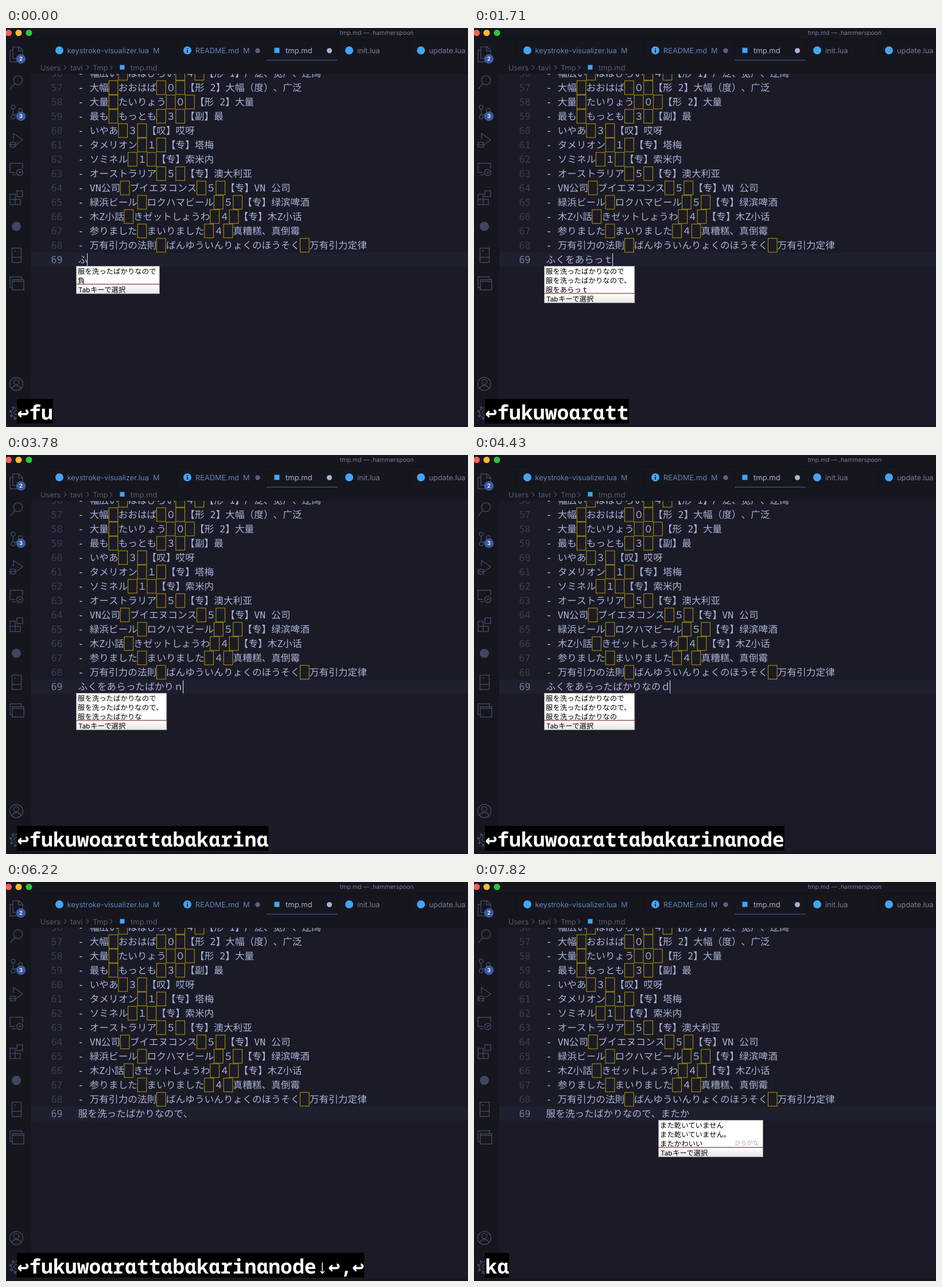
Animation of 805 by 696 pixels, one loop 8000 ms. Source, as an HTML page:

```html
<!DOCTYPE html>
<html lang="ja">
<head>
<meta charset="utf-8">
<title>Typing in an editor</title>
<style>
  html, body { margin: 0; width: 100%; height: 100%; overflow: hidden; background: #1a1b26; }
  svg { display: block; }
  text { white-space: pre; text-rendering: geometricPrecision; font-family: Inter, 'Noto Sans CJK JP', sans-serif; }
  .code { font: 16.66px 'DejaVu Sans Mono', 'Noto Sans CJK SC', 'Noto Sans CJK JP', 'Noto Sans CJK', monospace; }
  .ime { font: 12.4px 'Noto Sans CJK JP', 'Noto Sans CJK', sans-serif; }
  .keys { font: 600 34.75px 'Noto Sans Mono', 'DejaVu Sans Mono', monospace; }
  .icons { fill: none; stroke: #40465f; stroke-width: 1.5; }
</style>
</head>
<body>
<svg id="stage" width="805" height="696" viewBox="0 0 805 696"></svg>
<script>
const LOOP = 8000, LEFT = 125.6, EM = 16.66, HALF = 10.03, LINE = 25, LAST_TOP = 391.5;
const BLUE = '#42a5f5', FG = '#a9b1d6', GIT = '#6183bb', DIM = '#787c99';

const rect = (x, y, w, h, fill, more = '') =>
  `<rect x="${x}" y="${y}" width="${w}" height="${h}" fill="${fill}" ${more}/>`;
const circle = (x, y, r, fill, more = '') =>
  `<circle cx="${x}" cy="${y}" r="${r}" fill="${fill}" ${more}/>`;
const text = (x, y, str, fill, size = 12.8, more = '') =>
  `<text x="${x}" y="${y}" fill="${fill}" font-size="${size}" ${more}>${str}</text>`;
const path = d => `<path d="${d}"/>`;

// Code text on the editor grid; ideographic spaces get a warning box.
function codeText(str, x, top, fill) {
  const xs = [];
  let boxes = '';
  for (const c of str) {
    xs.push(x.toFixed(2));
    if (c === '　') boxes += rect(x + .3, top + .5, EM - 1, 24, 'none', 'stroke="#bd9b03"');
    x += c < '\x7f' ? HALF : EM;
  }
  return boxes + text(xs.join(' '), top + 18.8, str, fill, EM, 'class="code"');
}

const rows = [
  '幅広い　はばひろい　４　【形 1】广泛、宽广、辽阔',
  '大幅　おおはば　０　【形 2】大幅（度）、广泛',
  '大量　たいりょう　０　【形 2】大量',
  '最も　もっとも　３　【副】最',
  'いやあ　３　【叹】哎呀',
  'タメリオン　１　【专】塔梅',
  'ソミネル　１　【专】索米内',
  'オーストラリア　５　【专】澳大利亚',
  'VN公司　ブイエヌコンス　５　【专】VN 公司',
  '緑浜ビール　ロクハマビール　５　【专】绿滨啤酒',
  '木Z小話　きゼットしょうわ　４　【专】木Z小话',
  '参りました　まいりました　４　真糟糕、真倒霉',
  '万有引力の法則　ばんゆういんりょくのほうそく　万有引力定律',
];

function editor() {
  let out = rect(44, LAST_TOP, 761, LINE, '#1e202e');
  for (let i = 0; i <= rows.length; i++) {
    const top = LAST_TOP - (rows.length - i) * LINE, current = i === rows.length;
    out += text(98.5, top + 18.8, 56 + i, current ? '#737aa2' : '#363b54', EM, 'class="code" text-anchor="end"');
    if (!current) out += codeText('-', LEFT, top, '#89ddff') + codeText(rows[i], LEFT + 2 * HALF, top, FG);
  }
  return out;
}

function header() {
  const tabEdges = [73.5, 297.5, 453.5, 578.5, 703.5].map(x => rect(x, 21, 1, 36, '#101014')).join('');
  const chevrons = [101, 140, 181].map(x => path(`M${x} 65l4 4-4 4`)).join('');
  return rect(0, 0, 805, 80, '#16161e') + rect(0, 20, 805, 1, '#101014') + tabEdges
    + rect(454, 55.5, 124, 1.2, '#3d59a1')
    + circle(4.5, 8.5, 5.5, '#ff5f57') + circle(22, 8.5, 5.5, '#febc2e') + circle(40, 8.5, 5.5, '#28c840')
    + text(646, 11.5, 'tmp.md — .hammerspoon', DIM, 10.5, 'text-anchor="middle"')
    + [93, 598, 723].map(x => circle(x, 39, 7, BLUE)).join('')
    + circle(316, 39, 7, BLUE) + rect(315.1, 38, 1.8, 5, '#16161e') + rect(315.1, 35, 1.8, 1.8, '#16161e')
    + rect(467.5, 34.5, 9, 9, BLUE) + rect(198.5, 64.5, 8, 8, BLUE)
    + text(106.5, 44, 'keystroke-visualizer.lua', GIT) + text(256, 44, 'M', GIT)
    + text(330, 44, 'README.md', GIT) + text(413, 44, 'M', GIT) + circle(438.5, 39.5, 4.3, '#5a6080')
    + text(487, 44, 'tmp.md', FG, 13) + circle(563.5, 39.5, 4.5, FG)
    + text(612, 44, 'init.lua', DIM) + text(737, 44, 'update.lua', DIM)
    + `<g class="icons">${chevrons}</g>`
    + text(60, 73.5, 'Users', '#545a78') + text(112, 73.5, 'tavi', '#545a78')
    + text(151, 73.5, 'Tmp', '#545a78') + text(217, 73.5, 'tmp.md', '#545a78', 13);
}

function sidebar() {
  const badge = (y, n) => circle(26, y, 8.3, '#3d59a1') + text(26, y + 3.4, n, '#fff', 9.5, 'text-anchor="middle" font-weight="600"');
  const ring = (x, y, r, more) => circle(x, y, r, 'none', more);
  return rect(0, 80, 44, 616, '#16161e') + rect(0, 692, 805, 4, '#16161e') + '<g class="icons">'
    + path('M12 33h11l6 6v14H12zM22 33v7h7M12 39H7v20h15v-6')
    + ring(21, 91, 7.8) + path('M15.5 97L7.5 106')
    + ring(12.5, 138, 3.5) + ring(25, 144, 3.5) + ring(12.5, 155, 3.5) + path('M12.5 141.5v10M25 147.5c0 4-4 4-12.5 4')
    + path('M13 194V184l16 11-10 7.5M6 199l3 2M6 208l3-2M18 199l-3 2M18 208l-3-2M5 203.5h14') + ring(12, 203.5, 4.5)
    + path('M16 252H7v-16h22v9M11 256h6M22.5 250l2 2-2 2M27 250l-2 2') + ring(24, 252, 5.5)
    + path('M7 290h9v9h9v9H7zM7 299h9v9') + rect(19, 284, 10, 10, 'none')
    + circle(18, 346, 8, '#40465f', 'stroke="none"')
    + rect(10.5, 384, 16, 25, 'none') + path('M10.5 400h16M14 389h3')
    + path('M11 453H7v-19h20v5') + rect(11, 439, 20, 18, 'none') + path('M11 442h20')
    + ring(18, 621, 11.5) + ring(18, 617.5, 4.5) + path('M10 629c2-7 14-7 16 0')
    + ring(18, 671, 4) + ring(18, 671, 8.5) + ring(18, 671, 11, 'style="stroke-width:3" stroke-dasharray="4.32"')
    + '</g>' + badge(54, 2) + badge(154, 3);
}

const ime = (x, y, str, fill = '#000') => text(x, y, str, fill, 12.4, 'class="ime"');
const frame = (x, w, h) =>
  rect(x + .5, 415.5, w - 1, h - 1, '#fff', 'stroke="#8a8a8a"');

function suggestions(x, items, note) {
  const split = 415 + 16 * items.length;
  const w = Math.max(...items.map(s => s.length)) * 12.4 + (note ? 59 : 9.5);
  return frame(x, w, split - 398)
    + rect(x + 1, split, w - 2, 16, 'url(#foot)') + rect(x, split - .7, w, 1.2, '#8c2f2a')
    + items.map((s, i) => ime(x + 3, 428.7 + 16 * i, s)).join('')
    + (note ? text(x + 133, split - 4, note, '#aaa', 10.6) : '')
    + text(x + 4, split + 14, 'Tab', '#000', 11.8) + ime(x + 25.2, split + 14.2, 'キーで選択');
}

const DONE = '服を洗ったばかりなので';

function conversion() {
  return frame(101, 260, 50) + rect(102, 432, 19, 15, '#f1f1f1') + rect(102, 447, 258, 17, 'url(#foot)')
    + rect(102, 416.5, 258, 15, '#d9effc', 'stroke="#8fc3e6"') + rect(101, 447, 260, 1, '#444')
    + text(108, 428.5, 1, '#888', 11.5) + text(108, 444.5, 2, '#888', 11.5)
    + ime(125, 428.7, DONE) + ime(125, 444.7, DONE + '、')
    + text(104, 459, 'Doovia', '#888', 10.8)
    + text(146, 461.5, 'control+fn+delete', '#000', 11.8) + ime(247, 461.7, 'で履歴から削除')
    + text(344, 461.5, '1/2', '#000', 11.8);
}

const withThird = third => suggestions(122, [DONE, DONE + '、', third]);
const MATA = 'また乾いていません';

// Each track lists [start time, value].
const keyRuns = [
  [0, '↩fu', []],
  [0, 'kuwoarattabakarinanode↓↩,↩', [110, 230, 470, 590, 1070, 1310, 1360, 1540, 1710, 1950, 2430, 2490,
    2660, 2780, 3190, 3250, 3490, 3780, 4070, 4190, 4250, 4430, 4910, 5150, 5560, 5740]],
  [6930, 'mata', [6930, 7050, 7110, 7220]],
  [7760, 'ka', [7760, 7820]],
];
const lineTrack = [
  [0, 'ふ'], [110, 'ふｋ'], [230, 'ふく'], [470, 'ふくｗ'], [590, 'ふくを'], [1070, 'ふくをあ'],
  [1310, 'ふくをあｒ'], [1360, 'ふくをあら'], [1540, 'ふくをあらｔ'], [1710, 'ふくをあらっｔ'],
  [1950, 'ふくをあらった'], [2430, 'ふくをあらったｂ'], [2490, 'ふくをあらったば'],
  [2720, 'ふくをあらったばｋ'], [2840, 'ふくをあらったばか'], [3190, 'ふくをあらったばかｒ'],
  [3250, 'ふくをあらったばかり'], [3550, 'ふくをあらったばかりｎ'], [3840, 'ふくをあらったばかりな'],
  [4070, 'ふくをあらったばかりなｎ'], [4190, 'ふくをあらったばかりなの'], [4250, 'ふくをあらったばかりなのｄ'],
  [4490, 'ふくをあらったばかりなので'], [4910, DONE], [5560, DONE + '、'], [6990, DONE + '、ｍ'],
  [7050, DONE + '、ま'], [7110, DONE + '、まｔ'], [7280, DONE + '、また'],
  [7760, DONE + '、またｋ'], [7820, DONE + '、またか'],
];
const popupTrack = [
  [0, suggestions(122, [DONE, '負'])], [230, withThird('服を')], [590, withThird('服を洗った')],
  [1360, withThird('服を荒らす')], [1540, withThird('服をあらｔ')], [1710, withThird('服をあらっｔ')],
  [1950, withThird('服を洗った')], [2490, withThird('服を洗ったばかり')],
  [3780, withThird('服を洗ったばかりな')], [4190, withThird('服を洗ったばかりなの')],
  [4490, suggestions(122, [DONE, DONE + '、'])], [4910, conversion()], [5150, ''],
  [7050, suggestions(321, [MATA, 'また', 'まだ'])],
  [7280, suggestions(321, [MATA, MATA + '。', 'また'], 'ひらがな')],
  [7820, suggestions(321, [MATA, MATA + '。', 'またかわいい'], 'ひらがな')],
];
const cursorTrack = [[0, true], [4910, false], [5150, true], [6220, false], [6750, true], [7820, false]];

const at = (track, t) => track.findLast(([start]) => start <= t)[1];

function pressedKeys(t) {
  if (t >= 6930) {
    const [, keys, times] = keyRuns.findLast(([start]) => start <= t);
    return keys.slice(0, times.filter(k => k <= t).length);
  }
  const [[, first], [, rest, times]] = keyRuns;
  return first + rest.slice(0, times.filter(k => k <= t).length);
}

function keyOverlay(keys) {
  const step = 20.85;
  const xs = [...keys].map((_, i) => (19.4 + i * step).toFixed(2)).join(' ');
  // ɑ gives the single-storey letter shape.
  return rect(19, 647, keys.length * step + .4, 43, '#000')
    + text(xs, 682.5, keys.replace(/a/g, 'ɑ'), '#fff', 34.75, 'class="keys"');
}

function scene(t) {
  const line = at(lineTrack, t);
  const cursorX = Math.round(LEFT + line.length * EM);
  const committed = t >= 5150 && t < 6990;
  const cursor = at(cursorTrack, t)
    ? rect(cursorX - (committed ? 0 : 1), committed ? 391 : 393, 1.2, committed ? 26 : 23, '#c0caf5') : '';
  return codeText(line, LEFT, LAST_TOP, FG) + cursor + at(popupTrack, t) + keyOverlay(pressedKeys(t));
}

document.getElementById('stage').innerHTML =
  `<defs><linearGradient id="foot" x2="0" y2="1"><stop stop-color="#fff"/><stop offset="1" stop-color="#e6e6e6"/></linearGradient></defs>`
  + editor() + header() + sidebar() + '<g id="live"></g>';

const live = document.getElementById('live');
let shown = '';
function draw() {
  const next = scene(performance.now() % LOOP);
  if (next !== shown) live.innerHTML = shown = next;
  requestAnimationFrame(draw);
}
draw();
</script>
</body>
</html>
```
